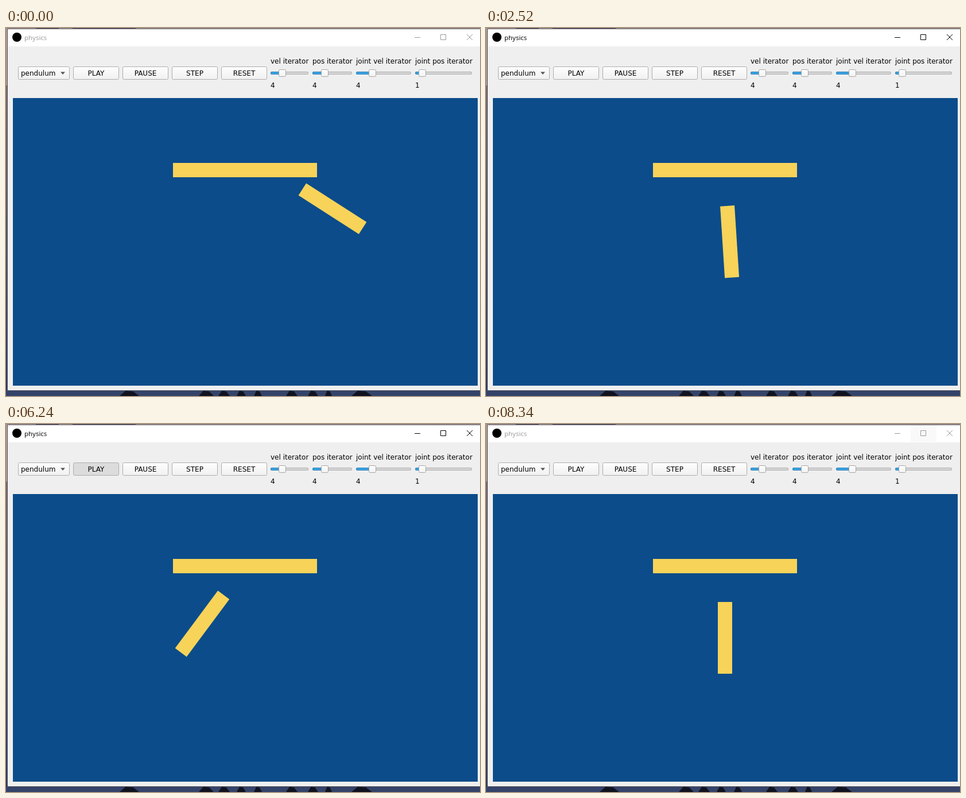
An HTML page with a canvas for the animation above (8.4 s loop, 826 by 641 pixels).

```html
<!DOCTYPE html>
<html lang="en">
<head>
<meta charset="utf-8">
<title>physics</title>
<style>
  html, body { margin: 0; width: 100%; height: 100%; overflow: hidden; background: #efefef; }
  canvas { display: block; width: 826px; height: 641px; }
</style>
</head>
<body>
<canvas id="stage" width="826" height="641"></canvas>
<script>
const ctx = document.getElementById('stage').getContext('2d');
const LOOP = 8400, TICK = 60, RAD = Math.PI / 180;
const PIVOT = { x: 416.5, y: 247.5 };
const YELLOW = '#f7d359', BLUE = '#0c4c8a';
const UI_FONT = '12px "DejaVu Sans", sans-serif';

const buttons = [['PLAY', 117], ['PAUSE', 203], ['STEP', 289], ['RESET', 375]];
const sliders = [
  { label: 'vel iterator', x: 461, end: 527, knob: 481.5, value: '4' },
  { label: 'pos iterator', x: 534, end: 603, knob: 555.5, value: '4' },
  { label: 'joint vel iterator', x: 610, end: 706, knob: 638.5, value: '4' },
  { label: 'joint pos iterator', x: 713, end: 812, knob: 725.5, value: '1' }
];

// Single steps while paused: [release time, angle]
const steps = [
  [2520, 3.7], [3420, 0.3], [3720, -3.4], [3900, -6.7],
  [4020, -10], [4140, -13.4], [4260, -16.7], [4380, -20],
  [4800, -22.9], [5040, -25.7], [5160, -28.5], [5340, -31.3],
  [5460, -34], [5580, -36.6]
];

// Button presses: [label, down, up]
const presses = [
  ['PLAY', 780, 840], ['PAUSE', 2940, 3060], ['PLAY', 6240, 6300], ['RESET', 7500, 7560],
  ...steps.filter(([t]) => t > 3000 && t !== 3900).map(([t]) => ['STEP', t - TICK, t])
];

const swing = (amp, time, phase, rate) =>
  amp * Math.exp(-time * 1e-4) * Math.cos((phase + time / TICK * rate) * RAD);

function angleAt(t) {
  if (t < 2520) return swing(62, t - 804, 0, 41.3);
  if (t < 6300) return steps.filter(([time]) => time <= t).pop()[1];
  if (t < 7560) return swing(52.1, t - 6295, 135, 41.1);
  return 0;
}

function rect(x, y, w, h, color) {
  ctx.fillStyle = color;
  ctx.fillRect(x, y, w, h);
}

function rounded(x, y, w, h, r, fill, stroke) {
  ctx.beginPath();
  ctx.roundRect(x + 0.5, y + 0.5, w - 1, h - 1, r);
  ctx.fillStyle = fill;
  ctx.fill();
  ctx.strokeStyle = stroke;
  ctx.lineWidth = 1;
  ctx.stroke();
}

function text(str, x, y, align = 'left', color = '#000', font = UI_FONT) {
  ctx.font = font;
  ctx.textAlign = align;
  ctx.fillStyle = color;
  ctx.fillText(str, x, y);
}

function shade(y, h, top, bottom) {
  const g = ctx.createLinearGradient(0, y, 0, y + h);
  g.addColorStop(0, top);
  g.addColorStop(1, bottom);
  return g;
}

function drawDesktop() {
  rect(0, 0, 826, 641, '#344369');
  rect(0, 0, 826, 1, '#b29c9a');
  rect(52, 0, 40, 1, '#554a5c');
  rect(116, 0, 110, 1, '#554a5c');
  rect(0, 1, 3, 631, shade(0, 631, '#8d7477', '#2c3a60'));
  rect(0, 0, 3, 100, '#b39a95');
  ctx.fillStyle = '#10131f';
  for (const [x, w] of [[198, 34], [336, 26], [370, 20], [402, 16], [432, 14], [488, 20], [526, 18], [556, 12], [602, 36]]) {
    ctx.beginPath();
    ctx.moveTo(x, 641);
    ctx.lineTo(x + w * 0.3, 632);
    ctx.lineTo(x + w * 0.7, 633);
    ctx.lineTo(x + w, 641);
    ctx.fill();
  }
  rect(2, 1, 824, 631, '#55555c');
}

function drawTitle(active, hover) {
  const ink = active ? '#000' : '#999';
  rect(3, 2, 823, 30, '#fff');
  if (hover) rect(740, 2, 45, 29, '#f9f9f9');
  ctx.fillStyle = '#000';
  ctx.beginPath();
  ctx.arc(19, 16, 8, 0, 7);
  ctx.fill();
  text('physics', 32, 21, 'left', ink, '11.5px "Open Sans", sans-serif');
  ctx.strokeStyle = ink;
  ctx.lineWidth = 1;
  ctx.beginPath();
  ctx.moveTo(712, 16.5);
  ctx.lineTo(722, 16.5);
  ctx.rect(757.5, 11.5, 9, 9);
  ctx.moveTo(803, 11);
  ctx.lineTo(813, 21);
  ctx.moveTo(813, 11);
  ctx.lineTo(803, 21);
  ctx.stroke();
}

function drawButton(x, w, down) {
  rounded(x, 67, w, 23, 2, down ? '#dcdcdc' : shade(67, 23, '#fefefe', '#f0f0f0'), '#adadad');
}

function drawSlider({ label, x, end, knob, value }) {
  text(label, x, 62);
  rounded(x, 76, end - x, 5, 1.5, '#d6d6d6', '#adadad');
  rounded(x, 76, knob - x, 5, 1.5, '#3ba3e3', '#2b82b9');
  rounded(knob - 6.5, 72, 13, 13, 2, shade(72, 13, '#fefefe', '#f2f2f2'), '#a5a5a5');
  text(value, x, 104);
}

function drawToolbar(t) {
  drawButton(21, 90, false);
  text('pendulum', 26, 83);
  ctx.fillStyle = '#555';
  ctx.beginPath();
  ctx.moveTo(95, 76.5);
  ctx.lineTo(103, 76.5);
  ctx.lineTo(99, 81);
  ctx.fill();
  for (const [label, x] of buttons) {
    drawButton(x, 80, presses.some(([name, from, to]) => name === label && t >= from && t < to));
    text(label, x + 40, 83, 'center');
  }
  sliders.forEach(drawSlider);
}

function drawBar(x, y, angle) {
  ctx.save();
  ctx.translate(x, y);
  ctx.rotate(-angle * RAD);
  rect(-12.5, -62.5, 25, 125, YELLOW);
  ctx.restore();
}

function drawScene(t) {
  rect(12, 122, 810, 501, BLUE);
  rect(291, 235, 251, 25, YELLOW);
  if (t < 840) {
    drawBar(569, 314.8, 57.3);
    return;
  }
  const a = angleAt(t);
  drawBar(PIVOT.x + 125 * Math.sin(a * RAD), PIVOT.y + 125 * Math.cos(a * RAD), a);
}

function draw(t) {
  drawDesktop();
  drawTitle(t >= 780 && t < 8340, t >= 6720);
  rect(3, 32, 823, 599, '#efefef');
  drawToolbar(t);
  drawScene(t);
}

const start = performance.now();
function loop() {
  const t = (performance.now() - start) % LOOP;
  draw(Math.floor(t / TICK) * TICK);
  requestAnimationFrame(loop);
}
loop();
</script>
</body>
</html>
```
